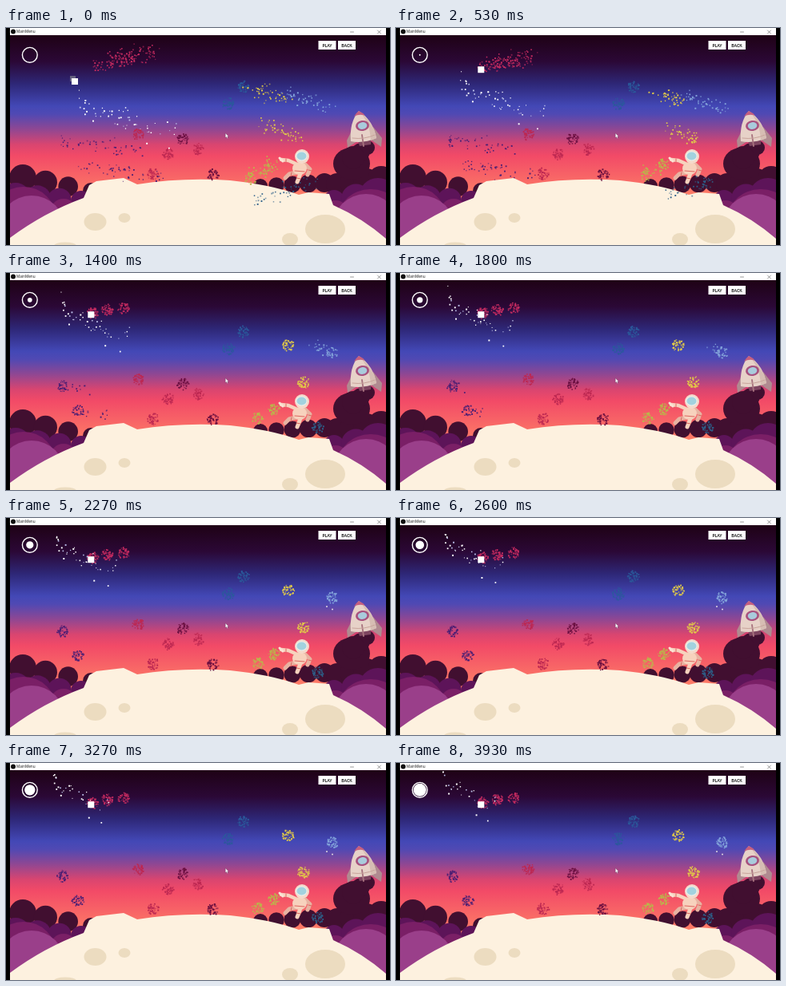
An HTML page with a canvas that plays this animation: 480 by 272 pixels, repeating every 3.99 s.

```html
<!DOCTYPE html>
<html lang="en">
<head>
<meta charset="utf-8">
<title>MainMenu</title>
<style>
html, body { margin: 0; width: 100%; height: 100%; overflow: hidden; background: #000; }
canvas { display: block; width: 480px; height: 272px; }
</style>
</head>
<body>
<canvas id="stage"></canvas>
<script>
const W = 480, H = 272, LOOP = 3990, STEP = 66.5, TAU = Math.PI * 2;
const scale = Math.max(1, window.devicePixelRatio || 1);

function prepare(canvas) {
  canvas.width = W * scale;
  canvas.height = H * scale;
  const c = canvas.getContext('2d');
  c.scale(scale, scale);
  return c;
}
const g = prepare(document.getElementById('stage'));
const scenery = document.createElement('canvas');
const s = prepare(scenery);

let seed = 71;
function rnd() {
  seed = (seed + 0x6d2b79f5) | 0;
  let v = Math.imul(seed ^ (seed >>> 15), 1 | seed);
  v = (v + Math.imul(v ^ (v >>> 7), 61 | v)) ^ v;
  return ((v ^ (v >>> 14)) >>> 0) / 4294967296;
}
const spread = n => (rnd() + rnd() - 1) * n;
const mix = (a, b, k) => a + (b - a) * k;

// ---------- scenery ----------
function oval(c, color, x, y, rx, ry = rx, turn = 0) {
  c.fillStyle = color;
  c.beginPath();
  c.ellipse(x, y, rx, ry, turn, 0, TAU);
  c.fill();
}
function square(x, y, size, color) {
  g.fillStyle = color;
  g.fillRect(x - size / 2, y - size / 2, size, size);
}
function shape(path, color) {
  s.fillStyle = color;
  s.fill(new Path2D(path));
}
function line(path, color, width) {
  s.strokeStyle = color;
  s.lineWidth = width;
  s.lineCap = s.lineJoin = 'round';
  s.stroke(new Path2D(path));
}
function label(text, x, y, font, align) {
  s.font = font;
  s.textAlign = align;
  s.textBaseline = 'middle';
  s.fillText(text, x, y);
}

function sky() {
  const sweep = s.createLinearGradient(0, 10, 0, 210);
  const stop = (y, color) => sweep.addColorStop((y - 10) / 200, color);
  stop(10, '#1f0216');
  stop(42, '#2b0836');
  stop(70, '#2e2777');
  stop(98, '#4348b6');
  stop(108, '#5049b3');
  stop(126, '#8c4794');
  stop(146, '#d94570');
  stop(160, '#f24a67');
  stop(210, '#fd7d66');
  s.fillStyle = sweep;
  s.fillRect(0, 9, W, H);
}

// a row of n bumps, sliding in place and size from one [x, y, r] to another
function bank(color, n, from, to) {
  for (let i = 0; i < n; i++) {
    oval(s, color, ...from.map((v, j) => mix(v, to[j], i / (n - 1))));
  }
}

function bushes() {
  const back = '#410f30', mid = '#5d1459', front = '#7a1f66', near = '#9a3f8a';
  bank(back, 4, [21, 188, 17], [106, 204, 10]);
  bank(back, 5, [318, 198, 9], [398, 194, 12]);
  bank(back, 4, [414, 196, 14], [469, 190, 17]);
  oval(s, back, 432, 170, 23, 20);
  bank(back, 3, [452, 150, 9], [434, 162, 14]);
  bank(mid, 4, [12, 213, 19], [94, 217, 13]);
  bank(mid, 3, [410, 216, 13], [465, 212, 24]);
  bank(front, 2, [22, 240, 41], [72, 231, 17]);
  bank(front, 2, [412, 232, 16], [456, 246, 44]);
  oval(s, near, 32, 252, 42);
  oval(s, near, 450, 250, 42);
}

function moon() {
  shape('M5 263Q48 231 97 213L104 197L113 192L147 188L164 196Q220 187 280 191' +
    'Q330 196 366 209L378 206L404 208L409 222Q445 238 475 264V272H5Z', '#fdf1df');
  const crater = (...at) => oval(s, '#ecdcc0', ...at);
  crater(111.5, 243, 14, 11);
  crater(148, 238, 7.5, 6);
  crater(399, 252, 25, 18);
  crater(355, 265, 10, 8);
  crater(74, 273, 14, 4.5);
}

function rocket() {
  shape('M432 129L426 141L427 150L439 142Z', '#b08a90');
  shape('M459 124L470 138L469 149L456 140Z', '#b08a90');
  shape('M439 139L456 137L456 146L442 148Z', '#7e4560');
  shape('M441 104Q429 118 431 142Q447 145 463 138Q459 116 441 104Z', '#e7d2c8');
  shape('M441 104Q454 114 460 128L463 138L456 141Q455 118 441 104Z', '#d6bdb3');
  shape('M441 104Q437 107 435 111Q442 107 449 110Q446 106 441 104Z', '#c55f80');
  oval(s, '#a8517e', 445.5, 122.5, 8.5, 6.5, -0.15);
  oval(s, '#a9cbdc', 445.5, 122.5, 5.8, 4.4, -0.15);
  line('M445 134L447 148', '#a8747f', 1.8);
  line('M433 138Q448 140 461 134', '#c8a39a', 1);
}

function astronaut() {
  const suit = '#f7d2bd', shade = '#e8b3a1', red = '#dc6660';
  line('M374 171L380 177L377 184', shade, 5);
  line('M362 170L353 166L344 165', suit, 4.5);
  line('M363 181L354 183L349 188', shade, 5);
  line('M368 182L366 188L364 193', suit, 5);
  oval(s, suit, 367, 176, 9, 8);
  line('M361 179L373 180', red, 1.2);
  line('M350 164L350 168M357 181L356 186M363 188L368 189M378 178L382 179', red, 1);
  line('M342 163L346 167', '#fae3d4', 3);
  oval(s, '#f5dacb', 370, 161, 9);
  oval(s, '#e9f1ef', 369.5, 160.5, 7, 6);
  oval(s, '#a3d2de', 369.5, 160.5, 6, 5);
}

function chrome() {
  s.fillStyle = '#000';
  s.fillRect(0, 0, 5, H);
  s.fillRect(475, 0, 5, H);
  s.fillStyle = '#fff';
  s.fillRect(5, 0, 470, 9);
  oval(s, '#111', 9, 4.5, 3);
  label('MainMenu', 13, 5, '4.7px "Open Sans", sans-serif', 'left');
  line('M430.5 5H434.5M464.5 3L468.5 7M468.5 3L464.5 7', '#555', 0.6);
  for (const [text, x, w] of [['PLAY', 390.5, 22], ['BACK', 415, 22]]) {
    s.fillStyle = '#fff';
    s.fillRect(x, 16, w, 11);
    s.fillStyle = '#111';
    label(text, x + w / 2, 22, 'bold 5px Lato, sans-serif', 'center');
  }
}

sky();
bushes();
rocket();
moon();
astronaut();
chrome();

// ---------- swarms ----------
// Dots wait along a trail and run home at a steady pace; the farthest needs `time` ms.
const swarms = [
  { color: '#bd2852', homes: [[165, 133], [203, 158], [240, 152], [184, 183]] },
  { color: '#690f40', homes: [[221, 139], [259, 184]] },
  { color: '#2b5a9b', homes: [[297, 74], [278, 95]] },
  { color: '#c42b60', homes: [[108, 50], [127, 46], [147, 44]], trail: [40, -17], time: 1250 },
  { color: '#4a1f74', homes: [[71, 142], [90, 173]], trail: [108, 14], time: 2200 },
  { color: '#e4cc47', homes: [[353, 91], [372, 137]], trail: [-52, -16], time: 1200 },
  { color: '#b9b84a', homes: [[315, 182], [335, 171]], trail: [-14, 8], time: 1000 },
  { color: '#2d5f88', homes: [[390, 194]], trail: [-80, 22], time: 1300 },
  { color: '#83a3da', homes: [[408, 100]], trail: [-62, -19], time: 2500 }
];
const dots = [];
for (const { color, homes, trail = [0, 0], time = 1 } of swarms) {
  for (const [x, y] of homes) {
    for (let i = 0; i < 48; i++) {
      dots.push({
        x, y, color, trail, time,
        far: rnd(),
        drift: spread(8),
        alpha: rnd() < 0.65 ? 1 : 0.6,
        r: 7.2 * Math.sqrt(rnd()),
        angle: rnd() * TAU,
        speed: spread(0.0009),
        size: 1.2 + rnd() * 0.8
      });
    }
  }
}

function drawSwarms(t) {
  for (const d of dots) {
    const left = Math.max(0, d.far - t / d.time);
    const a = d.angle + d.speed * t;
    const r = d.r + 0.5 * Math.sin(t / 260 + d.angle * 3);
    g.globalAlpha = d.alpha;
    square(d.x + d.trail[0] * left + Math.cos(a) * r,
      d.y + d.trail[1] * left + Math.sin(a) * r + d.drift * Math.min(1, left * 4) * Math.sign(d.time - 1),
      d.size, d.color);
  }
  g.globalAlpha = 1;
}

// ---------- white trail, chasing the player ----------
const sparks = Array.from({ length: 56 }, () => ({
  along: rnd() * 2 - 1,
  dx: spread(10), dy: spread(22),
  size: 0.9 + rnd() * 1.1,
  color: rnd() < 0.8 ? '#fff' : '#b9bde8',
  phase: rnd() * TAU
}));

function drawSparks(t) {
  const k = Math.exp(-t / 1400);
  const x = mix(86, 153, k), y = mix(32, 115, k), reach = mix(32, 62, k);
  const count = mix(56, 26, t / LOOP);
  for (const p of sparks.slice(0, count)) {
    const py = y + p.along * 22 + p.dy + Math.cos(t / 430 + p.phase);
    if (py > 10) square(x + p.along * reach + p.dx + Math.sin(t / 500 + p.phase), py, p.size, p.color);
  }
  if (t > 1900) {
    square(401, 111, 1.6, '#f3eee8');
    square(408, 114.5, 1.6, '#f3eee8');
  }
}

function drawPlayer(t) {
  const k = 1 - (1 - Math.min(1, t / 430)) ** 2;
  if (!t) square(83.5, 63.5, 7, 'rgba(125,125,140,.7)');
  square(mix(86, 106.3, k), mix(67, 52.2, k), 8, '#fff');
}

function drawTimer(t) {
  g.strokeStyle = '#fff';
  g.lineWidth = 1.4;
  g.beginPath();
  g.arc(29.8, 33.8, 9.4, 0, TAU);
  g.stroke();
  oval(g, '#fff', 29.8, 33.8, t / 490);
}

const arrow = new Path2D('M274.3 131.8V137.6L275.6 136.5L276.6 138.5L277.5 138L276.6 136.1H278.2Z');
function drawCursor() {
  g.fillStyle = '#fff';
  g.fill(arrow);
  g.strokeStyle = 'rgba(40,20,50,.6)';
  g.lineWidth = 0.4;
  g.stroke(arrow);
}

const start = performance.now();
function frame() {
  const now = Math.max(0, performance.now() - start) % LOOP;
  const t = Math.floor(now / STEP) * STEP;
  g.drawImage(scenery, 0, 0, W, H);
  drawSwarms(t);
  drawSparks(t);
  drawPlayer(t);
  drawTimer(t);
  drawCursor();
  requestAnimationFrame(frame);
}
frame();
</script>
</body>
</html>
```
